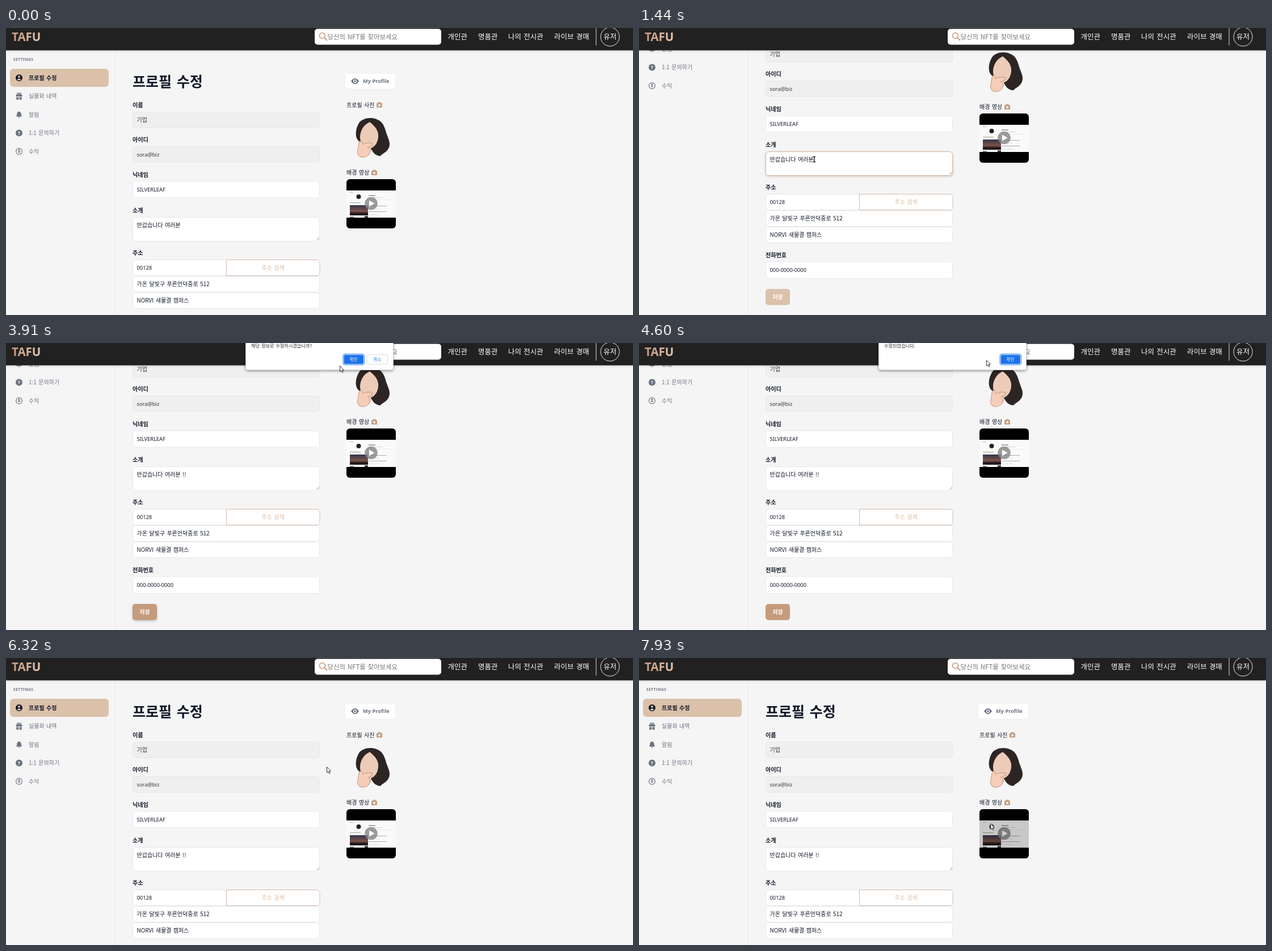
An HTML page with a canvas for the animation above (7.99 s loop, 1105 by 507 pixels).

```html
<!DOCTYPE html>
<html lang="ko">
<head>
<meta charset="utf-8">
<style>
html, body { margin: 0; width: 100%; height: 100%; overflow: hidden; background: #f5f5f5; }
canvas { display: block; width: 1105px; height: 507px; }
</style>
</head>
<body>
<canvas></canvas>
<script>
const W = 1105, H = 507, LOOP = 7990;
const canvas = document.querySelector('canvas');
const c = canvas.getContext('2d');
const dpr = window.devicePixelRatio || 1;
canvas.width = W * dpr;
canvas.height = H * dpr;

const KOREAN = '"Noto Sans CJK KR", "Noto Sans", sans-serif';
const LATIN = '"Noto Sans", "Noto Sans CJK KR", sans-serif';
const INK = '#111827', GRAY = '#6b7280', TAN = '#dbc1aa', BROWN = '#c49b7c', LINE = '#e5e7eb';

const TIME = {
  focus: 1400, space: 1900, bang: 2170, bang2: 2370, mouseBack: 2440, hover: 2930,
  blur: 3220, confirm: 3290, confirmed: 4330, alert: 4480, dismissed: 5480, reload: 6320, video: 6870
};

const MOUSE = [
  [70, 986, 205], [300, 800, 270], [560, 540, 336], [820, 495, 338], [1000, 480, 330],
  [1370, 309, 232], [2440, 309, 232], [2580, 340, 330], [2720, 300, 455], [2860, 250, 493],
  [3070, 245, 474], [3290, 250, 470], [3910, 588, 40], [4200, 610, 29], [4600, 612, 30],
  [5100, 650, 30], [5630, 650, 35], [6120, 565, 192], [6320, 565, 192], [6650, 690, 245],
  [7080, 659, 302], [7500, 640, 298], [7930, 619, 292]
];

const clamp01 = v => Math.max(0, Math.min(1, v));
const ease = (t, from, to) => { const k = clamp01((t - from) / (to - from)); return k * k * (3 - 2 * k); };
const during = (t, from, to) => t >= from && t < to;

function scrollAt(t) {
  return t >= TIME.reload ? 0 : 58 * (ease(t, 560, 740) + ease(t, 900, 1090));
}

function mouseAt(t) {
  const next = MOUSE.findIndex(p => p[0] > t);
  if (next < 0) return MOUSE[MOUSE.length - 1].slice(1);
  const a = MOUSE[Math.max(0, next - 1)], b = MOUSE[next];
  const k = ease(t, a[0], b[0]);
  return [a[1] + (b[1] - a[1]) * k, a[2] + (b[2] - a[2]) * k];
}

function text(s, x, cy, size, color = INK, { weight = 400, family = KOREAN, align = 'left', spacing = 0 } = {}) {
  c.font = `${weight} ${size}px ${family}`;
  c.textAlign = align;
  c.letterSpacing = spacing + 'px';
  c.wordSpacing = (family === KOREAN ? size * .12 : 0) + 'px';
  c.fillStyle = color;
  c.fillText(s, x, cy + size * 0.37);
}

function rect(x, y, w, h, color) {
  c.fillStyle = color;
  c.fillRect(x, y, w, h);
}

function box(x, y, w, h, r, fill, stroke, shadow) {
  c.save();
  c.beginPath();
  c.roundRect(x, y, w, h, r);
  if (shadow) { c.shadowColor = shadow; c.shadowBlur = 4 * dpr; c.shadowOffsetY = 1.5 * dpr; }
  c.fillStyle = fill;
  c.fill();
  c.restore();
  if (!stroke) return;
  c.beginPath();
  c.roundRect(x + .5, y + .5, w - 1, h - 1, r);
  c.strokeStyle = stroke;
  c.lineWidth = 1;
  c.stroke();
}

function disc(x, y, r, color) {
  c.beginPath();
  c.arc(x, y, r, 0, 7);
  c.fillStyle = color;
  c.fill();
}

function ring(x, y, r, color, width = 1) {
  c.beginPath();
  c.arc(x, y, r, 0, 7);
  c.strokeStyle = color;
  c.lineWidth = width;
  c.stroke();
}

function line(x1, y1, x2, y2, color, width = 1) {
  c.beginPath();
  c.moveTo(x1, y1);
  c.lineTo(x2, y2);
  c.strokeStyle = color;
  c.lineWidth = width;
  c.stroke();
}

function shape(d, color, x = 0, y = 0) {
  c.save();
  c.translate(x, y);
  c.fillStyle = color;
  c.fill(new Path2D(d));
  c.restore();
}

function sidebar() {
  rect(192, 0, 1, 700, '#e8e8ea');
  text('SETTINGS', 13, 56, 6.6, GRAY, { weight: 600, family: LATIN, spacing: .5 });
  box(7, 72, 174, 32, 6, TAN);
  ['프로필 수정', '실물화 내역', '알림', '1:1 문의하기', '수익'].forEach((s, i) =>
    text(s, 40, 88 + i * 32.5, 10, i ? GRAY : INK, { weight: i ? 500 : 700 }));

  disc(23, 88, 6, INK);
  disc(23, 86, 2, TAN);
  shape('M-3.6 3.2Q0-.5 3.6 3.2Q0 6 -3.6 3.2Z', TAN, 23, 88);

  rect(17.5, 118, 11, 3, GRAY);
  rect(18.3, 122, 4, 4.6, GRAY);
  rect(23.7, 122, 4, 4.6, GRAY);
  ring(21, 116.5, 1.6, GRAY, 1.4);
  ring(25, 116.5, 1.6, GRAY, 1.4);

  shape('M-5.2 3.4Q-3.6 2 -3.6-1.5Q-3.4-5 0-5.6Q3.4-5 3.6-1.5Q3.6 2 5.2 3.4ZM-1.7 4.3H1.7Q0 7 -1.7 4.3Z', GRAY, 23, 153);

  disc(23, 185.5, 6, GRAY);
  text('?', 23, 185.5, 9, '#f5f5f5', { weight: 700, family: LATIN, align: 'center' });
  ring(23, 218, 5.4, GRAY, 1.2);
  text('$', 23, 218, 8, GRAY, { weight: 600, family: LATIN, align: 'center' });
}

function introAt(t) {
  let s = '반갑습니다 여러분';
  if (t >= TIME.space) s += ' ';
  if (t >= TIME.bang) s += '!';
  if (t >= TIME.bang2) s += '!';
  return s;
}

function field(y, h, s, { disabled, family = KOREAN, width = 330 } = {}) {
  box(223, y, width, h, 5, disabled ? '#efefef' : '#fff', LINE);
  text(s, 230.5, y + h / 2, family === LATIN ? 9.3 : 10, disabled ? '#30353d' : INK, { family });
}

function introField(t) {
  const focused = during(t, TIME.focus, TIME.blur);
  box(223, 334, 330, 43, 5, '#fff', focused ? '#d3b299' : LINE, focused && 'rgba(150,100,65,.3)');
  line(547.5, 374.5, 552, 370, '#888', .8);
  line(550, 374.5, 552, 372.5, '#888', .8);
  const s = introAt(t);
  text(s, 230.5, 348, 10);
  const lastKey = [TIME.bang2, TIME.bang, TIME.space, TIME.focus].find(k => t >= k);
  if (focused && Math.floor((t - lastKey) / 500) % 2 === 0) {
    rect(Math.round(231 + c.measureText(s).width), 342, 1, 12, '#111');
  }
}

function form(t) {
  text('프로필 수정', 223, 94.5, 25, INK, { weight: 700 });
  [['이름', 136], ['아이디', 197], ['닉네임', 259], ['소개', 322], ['주소', 397.5], ['전화번호', 517]]
    .forEach(([s, y]) => text(s, 223, y, 10.1, INK, { weight: 700 }));

  field(148, 28.5, '기업', { disabled: true });
  field(209, 28.5, 'sora@biz', { disabled: true, family: LATIN });
  field(270.5, 30, 'SILVERLEAF', { family: LATIN });
  introField(t);
  field(409, 29, '00128', { family: LATIN, width: 166 });
  box(388, 409, 165.5, 29, [0, 5, 5, 0], '#fff', '#d2bcae');
  text('주소 검색', 470.5, 423.5, 10, '#d9b99f', { align: 'center', weight: 500 });
  field(438, 29, '가온 달빛구 푸른언덕중로 512');
  field(467, 29, 'NORVI 새물결 캠퍼스');
  field(528.5, 30.5, '000-0000-0000', { family: LATIN });

  const active = during(t, TIME.hover, TIME.reload);
  const raised = during(t, TIME.hover, TIME.confirmed);
  box(223, 577, 43, 28.5, 5, active ? BROWN : TAN, null, raised && 'rgba(0,0,0,.22)');
  text('저장', 244.5, 591, 10, '#fff', { weight: 700, align: 'center' });
}

function uploadIcon(x, y) {
  box(x + 2.5, y - 5, 5, 3, 1, BROWN);
  box(x, y - 3.5, 10, 8, 1.5, BROWN);
  rect(x + 4.3, y - 2, 1.4, 5, '#fff');
  rect(x + 2.5, y - .2, 5, 1.4, '#fff');
}

function avatar() {
  shape('M622 168C627 159 645 156 655 162C667 167 668 180 672 190C674 197 678 202 675 211C671 220 664 221 660 226C650 226 645 218 640 207L622 200C614 193 616 178 622 168Z', '#2c2524');
  shape('M641 166C630 171 624 182 624 193C624 204 632 214 640 213C650 212 657 201 656 188C655 178 648 172 641 166Z', '#edcbb9');
  shape('M622 201Q627 196 629 205Q638 200 646 203Q649 208 638 212Q645 213 642 220Q638 229 628 229Q618 227 619 218Z', '#c99a85');
  shape('M623 202Q627 198 628 206Q638 202 645 204Q647 208 636 211Q643 213 641 219Q638 228 629 228Q619 226 620 218Z', '#f6cdb8');
}

function videoCard(t) {
  c.save();
  c.beginPath();
  c.roundRect(600, 267, 87, 87, 6);
  c.clip();
  rect(600, 267, 87, 87, '#000');
  rect(600, 287, 87, 48, '#fafafa');
  rect(606, 290, 6, 1, '#bbb');
  disc(621.5, 298, 4, '#222');
  rect(639, 295.5, 12, 1.2, '#777');
  rect(639, 299, 25, 1, '#d5d5d5');
  rect(639, 303, 40, .7, '#e5e5e5');
  rect(606, 308, 19, 1.2, '#a3b09f');
  const sky = c.createLinearGradient(0, 313, 0, 330);
  sky.addColorStop(0, '#30364d');
  sky.addColorStop(.65, '#805448');
  sky.addColorStop(.8, '#332323');
  sky.addColorStop(1, '#17141a');
  c.fillStyle = sky;
  c.fillRect(606, 313, 32, 18);
  for (let i = 0; i < 4; i++) {
    rect(639, 314 + i * 5, i % 2 ? 20 : 32, 1, i % 2 ? '#ddd' : '#aaa');
  }
  rect(606, 333, 7, 2, '#888');
  rect(632, 332, 6, 3, '#444');
  disc(643.5, 310, 11.3, 'rgba(135,135,135,.82)');
  shape('M-3.5-5.5L6 0L-3.5 5.5Z', '#fff', 643.5, 310);
  if (t >= TIME.video) rect(600, 267, 87, 87, 'rgba(0,0,0,.2)');
  c.restore();
}

function profilePanel(t) {
  box(596, 79.5, 91.5, 29, 6, '#fff', '#e9eaec');
  shape('M-7 0Q0-10 7 0Q0 10 -7 0Z', GRAY, 615, 94);
  disc(615, 94, 3.1, '#fff');
  disc(615, 94, 1.8, GRAY);
  text('My Profile', 629, 94, 9.3, GRAY, { weight: 600, family: LATIN });
  text('프로필 사진', 600, 136, 10, INK, { weight: 500 });
  uploadIcon(653, 136);
  avatar();
  text('배경 영상', 600, 255.5, 10, INK, { weight: 500 });
  uploadIcon(644, 255.5);
  videoCard(t);
}

function header() {
  const shade = c.createLinearGradient(0, 39, 0, 44);
  shade.addColorStop(0, 'rgba(0,0,0,.1)');
  shade.addColorStop(1, 'rgba(0,0,0,0)');
  rect(0, 39, W, 5, shade);
  rect(0, 0, W, 39.5, '#212121');

  const brand = c.createLinearGradient(10, 0, 60, 0);
  brand.addColorStop(0, '#c4967b');
  brand.addColorStop(1, '#e6c7b0');
  text('TAFU', 10, 15.5, 20.5, brand, { weight: 600, family: LATIN });

  box(544, 1.5, 223, 28, 5, '#fff');
  ring(557.5, 13.5, 5, BROWN, 1.6);
  line(561, 17, 566, 22, BROWN, 1.8);
  text('당신의 NFT를 찾아보세요', 566.5, 15.5, 11.4, '#757575');
  [['개인관', 778.5], ['명품관', 832], ['나의 전시관', 885], ['라이브 경매', 966]]
    .forEach(([s, x]) => text(s, x, 15.5, 12.5, '#fff', { weight: 400 }));
  rect(1039.5, 0, 1, 31, '#ddd');
  ring(1064.5, 15.5, 16.5, '#eee');
  text('유저', 1064.5, 15.5, 12.5, '#fff', { weight: 400, align: 'center' });
}

function dialogButton(s, x, primary) {
  if (primary) {
    box(x - .5, 19, 38.5, 20, 3, '#fff', '#1a73e8');
    box(x + 1.5, 21, 34.5, 16, 2, '#1a73e8');
  } else {
    box(x, 20, 37, 18, 2.5, '#fff', '#dadce0');
  }
  text(s, x + 18.5, 29, 7.5, primary ? '#fff' : '#1a73e8', { weight: 500, align: 'center' });
}

function dialog(message, cancellable) {
  box(422, -40, 261, 88, 4, '#fff', '#d5d5d5', 'rgba(0,0,0,.4)');
  text(message, 432, 5, 8.2, '#333');
  dialogButton('확인', cancellable ? 594 : 636, true);
  if (cancellable) dialogButton('취소', 636, false);
}

function mouse(t) {
  if (t < 70 || during(t, TIME.space, TIME.mouseBack)) return;
  const [x, y] = mouseAt(t);
  const overText = t < 2800 && x > 223 && x < 553 && y < 445;
  c.save();
  c.translate(x, y);
  if (overText) {
    line(0, -4.5, 0, 4.5, '#222');
    for (const end of [-4.5, 4.5]) line(-2.5, end, 2.5, end, '#222');
  } else {
    const arrow = new Path2D('M.5.5V10.5L2.8 8.4L4.4 12L6 11.3L4.5 7.8H7.5Z');
    c.fillStyle = '#fff';
    c.fill(arrow);
    c.strokeStyle = '#222';
    c.lineWidth = .9;
    c.stroke(arrow);
  }
  c.restore();
}

function draw(now) {
  const t = now % LOOP;
  c.setTransform(dpr, 0, 0, dpr, 0, 0);
  rect(0, 0, W, H, '#f5f5f5');
  c.save();
  c.translate(0, -scrollAt(t));
  sidebar();
  form(t);
  profilePanel(t);
  c.restore();
  header();
  if (during(t, TIME.confirm, TIME.confirmed)) dialog('해당 정보로 수정하시겠습니까?', true);
  if (during(t, TIME.alert, TIME.dismissed)) dialog('수정되었습니다.', false);
  mouse(t);
  requestAnimationFrame(draw);
}

requestAnimationFrame(draw);
</script>
</body>
</html>
```
